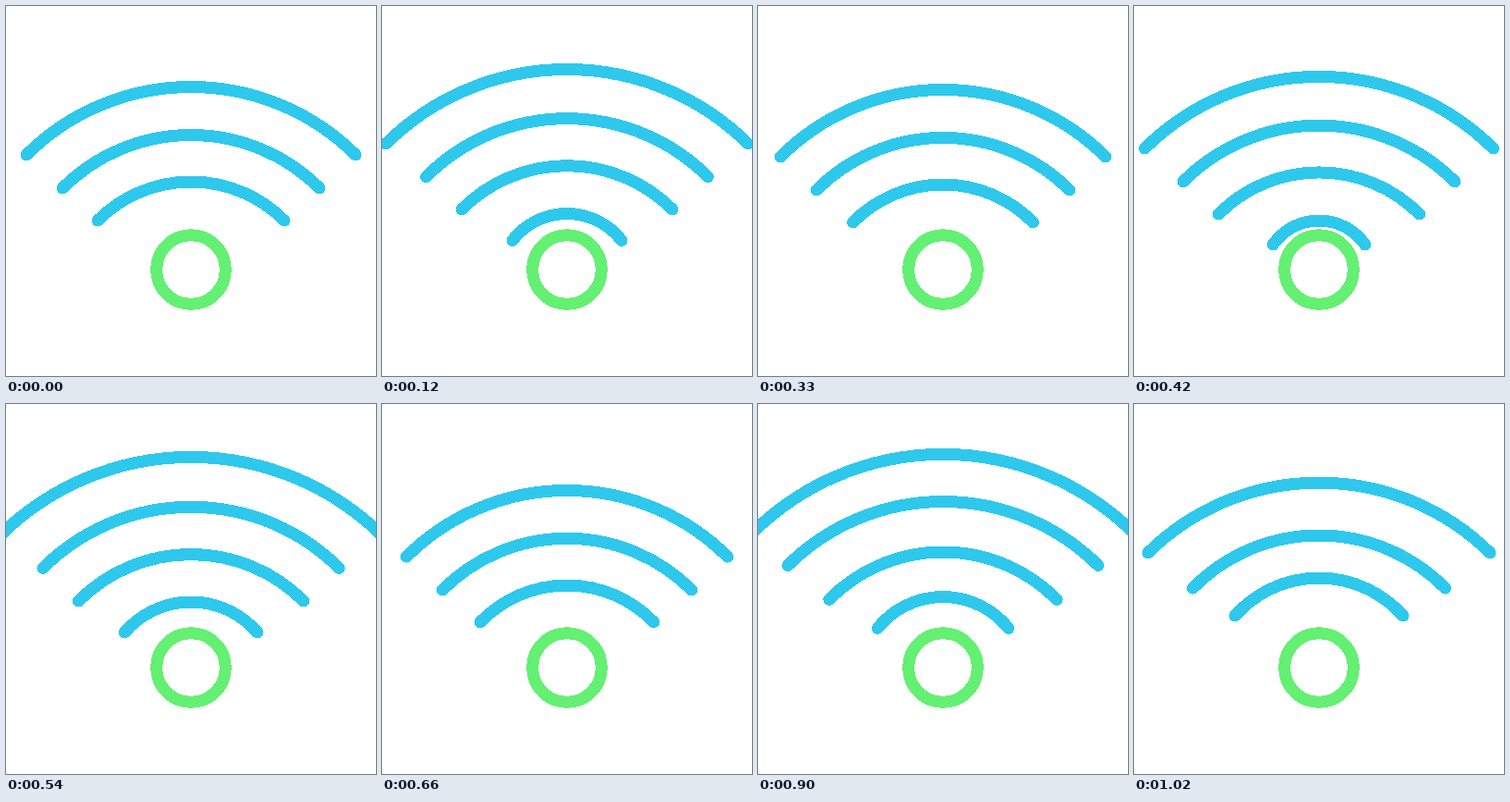
Animation of 400 by 400 pixels, one loop 1.05 s. Source, as an HTML page:

```html
<!DOCTYPE html>
<html lang="en">
<head>
<meta charset="utf-8">
<title>Signal waves</title>
<style>
  html, body { margin: 0; width: 100%; height: 100%; overflow: hidden; background: #fff; }
  svg { display: block; width: 100vw; height: 100vh; shape-rendering: crispEdges; }
  path, circle { fill: none; stroke-width: 13; stroke-linecap: round; }
  path { stroke: #2ec8ec; }
  circle { stroke: #64f073; }
</style>
</head>
<body>
<svg viewBox="0 0 400 400">
  <g id="waves"></g>
  <circle cx="200" cy="285" r="37.3"/>
</svg>
<script>
  const LOOP = 1050, CYCLE = 350, STEP = 30;

  // Each pose is [top y, half width, end y]; a wave travels from one pose to the next.
  const poses = [
    [242.5, 37, 264.5],
    [190, 101, 232],
    [139.5, 139, 197],
    [87.5, 178, 161],
    [32, 230, 126]
  ];
  // The last cycle runs a little past the usual poses before the loop restarts.
  const lastPoses = [
    [183, 96, 225.7],
    [137.5, 139.8, 196],
    [80, 189.3, 157.6],
    [29.5, 230, 126]
  ];

  const group = document.getElementById('waves');
  const waves = lastPoses.map(() =>
    group.appendChild(document.createElementNS('http://www.w3.org/2000/svg', 'path')));

  function arc([top, half, end]) {
    const sag = end - top;
    const r = (half * half + sag * sag) / (2 * sag);
    return `M${200 - half} ${end}A${r} ${r} 0 0 1 ${200 + half} ${end}`;
  }

  function isVisible(i, phase) {
    if (i === 0) return phase > 5;
    if (i === 3) return phase < 285;
    return true;
  }

  function draw(time) {
    const t = Math.floor((time % LOOP) / STEP) * STEP;
    const phase = t % CYCLE;
    const last = t >= 2 * CYCLE;
    waves.forEach((wave, i) => {
      const to = last ? lastPoses[i] : poses[i + 1];
      const pose = poses[i].map((v, k) => v + (to[k] - v) * phase / CYCLE);
      wave.setAttribute('d', arc(pose));
      wave.style.display = isVisible(i, phase) ? '' : 'none';
    });
  }

  const start = performance.now();
  function tick() {
    draw(performance.now() - start);
    requestAnimationFrame(tick);
  }
  tick();
</script>
</body>
</html>
```
